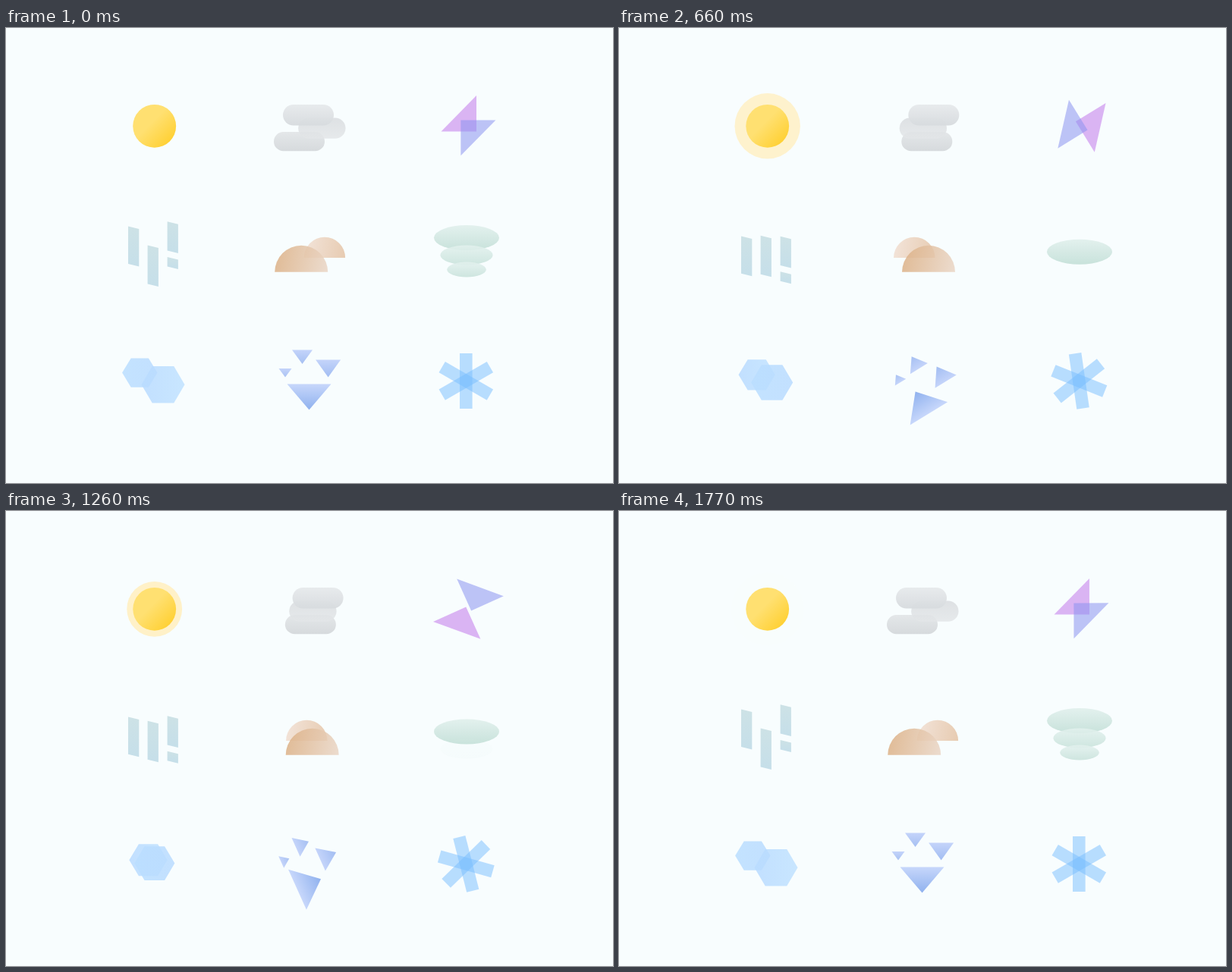
An HTML page with a canvas that plays this animation: 800x600 px, repeating every 1.8 s.

```html
<!DOCTYPE html>
<html lang="en">
<head>
<meta charset="utf-8">
<title>Weather icons</title>
<style>
html, body { margin: 0; width: 100%; height: 100%; overflow: hidden; background: #f8fdfe; }
canvas { display: block; }
</style>
</head>
<body>
<canvas id="stage" width="800" height="600"></canvas>
<script>
const ctx = document.getElementById('stage').getContext('2d');
const TAU = Math.PI * 2;
const LOOP = 1800, HALF = 900, END = 1780, STEP = 30;

const clamp = x => Math.min(1, Math.max(0, x));
const mix = (a, b, k) => a + (b - a) * k;
const ease = x => x * x * (3 - 2 * x);
const strongEase = x => x * x * x * (x * (6 * x - 15) + 10);

function grad(x0, y0, x1, y1, from, to, start = 0) {
  const g = ctx.createLinearGradient(x0, y0, x1, y1);
  g.addColorStop(start, from);
  g.addColorStop(1, to);
  return g;
}

// Draws in local coordinates around (x, y).
function at(x, y, angle, draw, alpha = 1) {
  ctx.save();
  ctx.translate(x, y);
  ctx.rotate(angle);
  ctx.globalAlpha = alpha;
  draw();
  ctx.restore();
}

function shape(fill, trace) {
  ctx.fillStyle = fill;
  ctx.beginPath();
  trace();
  ctx.fill();
}

function poly(fill, ...pts) {
  shape(fill, () => {
    pts.forEach(([x, y]) => ctx.lineTo(x, y));
    ctx.closePath();
  });
}

const disc = (r, fill) => shape(fill, () => ctx.arc(0, 0, r, 0, TAU));

function sun(p) {
  const x = 195.7, y = 129.3;
  at(x, y, 0, () => disc(28.3 + 20.3 * p, '#fff1c8'), 1 - ease(clamp((p - 0.667) * 3)));
  at(x, y, 0, () => disc(28.4, grad(-20, -20, 20, 20, '#ffe071', '#ffd136', 0.4)));
}

function pill(x, y, w, h, from, to, alpha) {
  at(x, y, 0, () => shape(grad(0, 0, 0, h, from, to), () => ctx.roundRect(0, 0, w, h, h / 2)), alpha);
}

function clouds(k) {
  pill(353 + 23.4 * k, 137, 67, 25.3, '#e4e7e9', '#d6dadd', 1);
  pill(385.2 - 18.8 * k, 118.5, 62.3, 27.3, '#d9dcdf', '#e3e6e8', 0.85);
  pill(365 + 19.8 * k, 101, 67, 27.5, '#e7eaec', '#d7dbde', 0.96);
}

function bolt(turn, k) {
  const dx = 10.3 * (1 - 2 * k), dy = 7.5 * (1 - 2 * k);
  at(609.7 + dx, 128.9 + dy, turn, () =>
    poly('rgba(195,121,235,.55)', [0, 0], [-46.5, 0], [0, -47.5]));
  at(609.7 - dx, 128.9 - dy, turn, () =>
    poly('rgba(140,148,240,.55)', [0, 0], [46, 0], [0, 46.8]));
}

function bar(x, y, h) {
  poly(grad(0, y, 0, y + h, '#cde2e6', '#c6dfe9'),
    [x, y], [x + 14.3, y + 3.5], [x + 14.3, y + h + 3.5], [x, y + h]);
}

function rain(k) {
  bar(161, 261.6 + 15.6 * k, 49.3);
  bar(186.6, 286.6 - 15.5 * k, 51);
  bar(212.6, 255.2 + 23.6 * k, 38.3);
  bar(212.6, 302 + 23.4 * k, 12.4);
}

function dune(x, y, r, from, to, alpha) {
  at(x, y, 0, () => shape(grad(-r, -r * 0.4, r, 0, from, to), () => ctx.arc(0, 0, r, Math.PI, TAU)), alpha);
}

function dunes(k) {
  dune(419.9 - 37.2 * k, 303, 27.2, '#f2e3d8', '#e7cbb1', 1);
  dune(389.2 + 22.8 * k, 321.8, 35, '#dcb085', '#ead6c6', 0.85);
}

function tornado(k, p) {
  const ring = (y, rx, ry, alpha) => at(607, y + 22.5 * k, 0, () =>
    shape(grad(0, -ry, 0, ry, '#e3f1ee', '#c8e2db'), () => ctx.ellipse(0, 0, rx, ry, 0, 0, TAU)), alpha);
  const fade = start => 1 - clamp((p - start) / 0.15);
  ring(276.6, 43, 16.5, 1);
  ring(299.4, 34.6, 13, 0.88 * fade(0.45));
  ring(318.5, 25.8, 10, 0.88 * fade(0.3));
}

function hexagon(k, from, to, alpha) {
  const w = mix(23.2, 28.5, k), h = mix(19.2, 24.2, k);
  at(mix(176.3, 207, k), mix(454.6, 470.3, k), 0, () =>
    poly(grad(-w, 0, w, 0, from, to),
      [-w, 0], [-w / 2, -h], [w / 2, -h], [w, 0], [w / 2, h], [-w / 2, h]), alpha);
}

function hail(k) {
  hexagon(1 - k, '#bfdeff', '#c6e5ff', 0.95);
  hexagon(k, '#badeff', '#b9dbff', 0.85);
}

function shards(turn, k) {
  const shard = (x, y, w, h, from, to) => at(x, y + 9 * k, turn, () =>
    poly(grad(0, -h, 0, h, from, to), [-w, -h], [w, -h], [0, h]));
  shard(390.5, 433.8, 13.5, 9.3, '#c4d4fa', '#a5bff2');
  shard(424.6, 449, 16.5, 11.5, '#c4d4fa', '#a2bdf2');
  shard(368, 454.8, 8.5, 5.8, '#c4d4fa', '#a9c2f3');
  shard(399.5, 486.5, 29, 17, '#c7d7fb', '#8fb1ee');
}

function snowflake(turn) {
  for (let i = 0; i < 3; i++) {
    at(606.3, 465.4, turn + i * TAU / 6, () =>
      shape('rgba(120,190,255,.5)', () => ctx.rect(-8.3, -36.5, 16.6, 73)));
  }
}

function draw(t) {
  const back = t >= HALF;
  const phase = back ? clamp((t - HALF) / (END - HALF)) : t / HALF;
  const p = back ? 1 - phase : phase;   // there and back
  const k = ease(p);
  const turn = Math.PI * (ease(phase) + back);

  ctx.fillStyle = '#f8fdfe';
  ctx.fillRect(0, 0, 800, 600);
  sun(t % HALF / HALF);
  clouds(k);
  bolt(turn, strongEase(p));
  rain(k);
  dunes(k);
  tornado(k, p);
  hail(k);
  shards(turn, k);
  snowflake(TAU * ease(clamp(t / END)));
}

function frame() {
  draw(Math.floor(performance.now() / STEP) * STEP % LOOP);
  requestAnimationFrame(frame);
}
frame();
</script>
</body>
</html>
```
